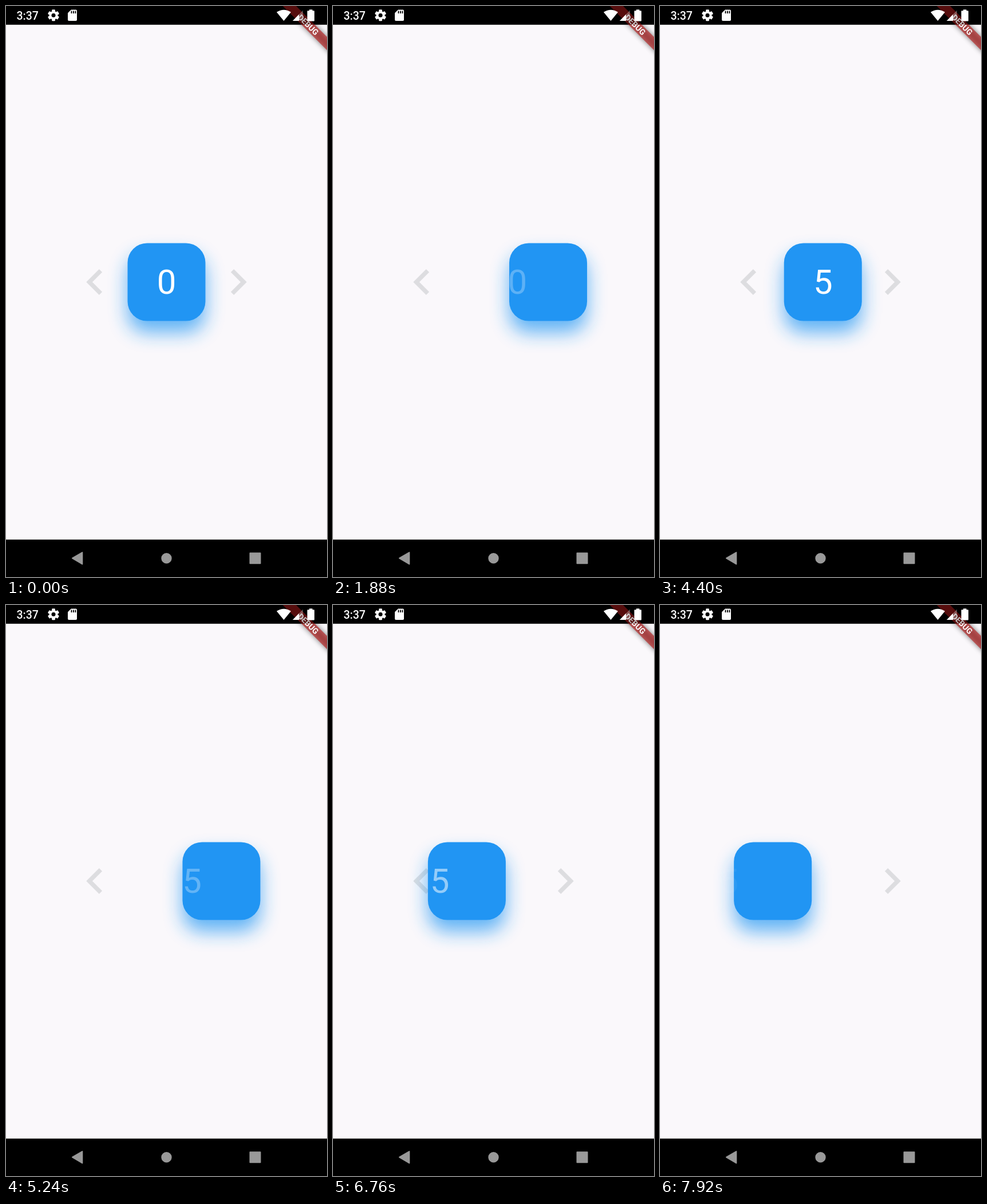
An HTML page for the animation above (8000 ms loop, 561 by 998 pixels).

```html
<!DOCTYPE html>
<html lang="en">
<head>
<meta charset="utf-8">
<title>Swipe counter</title>
<style>
  html, body { margin: 0; width: 100%; height: 100%; overflow: hidden; background: #faf8fb; }
  svg { display: block; width: 100vw; height: 100vh; }
  text { font-family: Roboto, sans-serif; fill: #fff; }
</style>
</head>
<body>
<svg viewBox="0 0 561 998">
  <defs>
    <filter id="glow" x="-60%" y="-60%" width="220%" height="220%"><feGaussianBlur stdDeviation="16.4"/></filter>
    <filter id="soft" x="-20%" y="-150%" width="140%" height="400%"><feGaussianBlur stdDeviation="4.8"/></filter>
    <rect id="tooth" x="-2.9" y="-10" width="5.8" height="20" rx="1.2"/>
    <path id="chevron" d="M15.41 7.41 14 6 8 12l6 6 1.41-1.41L10.83 12z"/>
  </defs>
  <rect width="561" height="998" fill="#faf8fb"/>

  <g fill="#dddde0">
    <use href="#chevron" transform="translate(110.3 437.5) scale(3.75)"/>
    <use href="#chevron" transform="translate(450.7 437.5) scale(-3.75 3.75)"/>
  </g>

  <g id="box">
    <rect x="-68" y="435" width="136" height="136" rx="34" fill="#2196f3" opacity=".7" filter="url(#glow)"/>
    <rect x="-68" y="414.5" width="136" height="136" rx="34" fill="#2195f3"/>
    <text id="num" y="503" font-size="60" text-anchor="middle">0</text>
  </g>

  <rect width="561" height="32.7"/>
  <rect y="932.6" width="561" height="65.4"/>

  <g transform="translate(561 0) rotate(45)">
    <rect x="-62" y="38.2" width="124" height="16.4" opacity=".5" filter="url(#soft)"/>
    <rect x="-62" y="38.2" width="124" height="16.4" fill="#b71c1c" fill-opacity=".627"/>
    <text y="51.4" font-size="13.9" font-weight="700" text-anchor="middle">DEBUG</text>
  </g>
  <rect width="561" height="32.7" opacity=".25"/>

  <!-- status icons sit above the ribbon -->
  <text x="18.5" y="23.7" font-size="19.5" font-weight="500">3:37</text>
  <g fill="#fff">
    <g transform="translate(83 16.3)">
      <use href="#tooth"/>
      <use href="#tooth" transform="rotate(60)"/>
      <use href="#tooth" transform="rotate(120)"/>
      <circle r="7.4"/>
      <circle r="3.5" fill="#000"/>
    </g>
    <path d="M108 12.2 113.8 6.4H122q2 0 2 2V24q0 2-2 2H110q-2 0-2-2z"/>
    <path d="M114.5 8.6v4.4M118 8.6v4.4M121.4 8.6v4.4" stroke="#000" stroke-width="1.8"/>
    <path d="M485.5 26 473 10.7Q485.5 2.6 498 10.7z"/>
    <path d="M501 26 519 7.5V26z" opacity=".3"/>
    <path d="M501 26 512 14.7V26z"/>
    <path d="M530 6.3h5.6v2H538q1 0 1 1V25.4q0 1-1 1H527.5q-1 0-1-1V9.3q0-1 1-1H530z"/>
  </g>

  <g fill="#999" stroke="#999" stroke-width="2" stroke-linejoin="round">
    <path d="M116 965.2 133.3 955V975.4z"/>
    <circle cx="280.5" cy="965.2" r="8.2"/>
    <rect x="426.5" y="956.2" width="18" height="18"/>
  </g>
</svg>
<script>
const LOOP = 8000, REST = 280.5;
const STEP = 553;  // time between counts while held
const FADE = 220;  // time for a digit to leave or enter

// Each pull: start, distance, first count, release
const pulls = [
  { start: 1400, reach: 88, count: 1926, free: 4248 },
  { start: 4780, reach: 88, count: 5290, free: 5630 },
  { start: 6240, reach: -43.5, count: 6694, free: 6975 },
  { start: 7640, reach: -87, count: 7932, free: LOOP }
];

// Every count the pulls cause, with the running value and its direction
let value = 0;
const counts = [];
for (const { reach, count, free } of pulls) {
  const dir = Math.sign(reach);
  for (let at = count; at < free; at += STEP) counts.push({ at, dir, value: value += dir });
}

// Damped spring from 1 to 0
function spring(ms) {
  const s = Math.max(0, ms) / 1000;
  return Math.exp(-10 * s) * (Math.cos(13.3 * s) + 0.75 * Math.sin(13.3 * s));
}

// The pull follows the same curve at a slower pace than the release
function offsetAt(t) {
  return pulls.reduce((x, { start, reach, free }) =>
    x + reach * (spring(t - free) - spring((t - start) * 0.55)), 0);
}

function digitAt(t) {
  const last = counts.findLast(c => c.at <= t);
  const next = counts.find(c => c.at > t);
  const digit = last ? last.value : 0;
  if (last && t - last.at < FADE) {
    const left = (1 - (t - last.at) / FADE) ** 2;
    return { digit, x: 98 * left * last.dir, alpha: 1 - left };
  }
  if (next && next.at - t < FADE) {
    const gone = (1 - (next.at - t) / FADE) ** 2;
    return { digit, x: -85 * gone, alpha: (1 - gone) ** 1.3 };
  }
  return { digit, x: 0, alpha: 1 };
}

const box = document.getElementById("box");
const num = document.getElementById("num");
const begin = performance.now();

function draw(now) {
  const t = Math.max(0, now - begin) % LOOP;
  const { digit, x, alpha } = digitAt(t);
  box.setAttribute("transform", `translate(${REST + offsetAt(t)} 0)`);
  num.textContent = digit;
  num.setAttribute("x", x);
  num.setAttribute("opacity", alpha);
  requestAnimationFrame(draw);
}
draw(begin);
</script>
</body>
</html>
```
